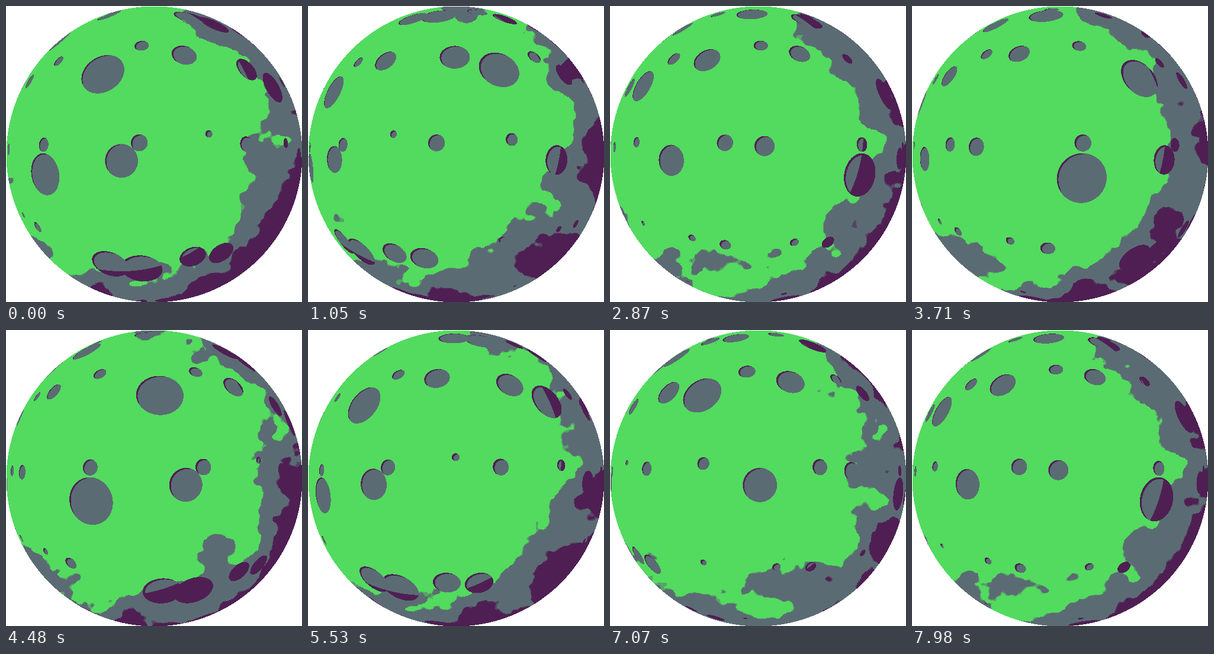
These frames come from a looping animation (500x500 px, 8000 ms). An HTML page with a canvas:

```html
<!DOCTYPE html>
<html lang="en">
<head>
<meta charset="utf-8">
<title>Rotating moon</title>
<style>
  html, body { margin: 0; width: 100%; height: 100%; overflow: hidden; background: #fff; }
  canvas { display: block; width: 500px; height: 500px; }
</style>
</head>
<body>
<canvas id="moon" width="500" height="500"></canvas>
<script>
const SIZE = 500;
const STEP_MS = 70, LOOP_MS = 8000, STEPS_PER_TURN = 72;
const SEED = 9.89;
const LIGHT = { x: 0.39, y: 0.43 };
const GROUND_CELLS = 8, CRATER_CELLS = 5, OCTAVES = 4;
const MID_EDGE = 0.615, DARK_EDGE = 0.729, CRATER_EDGE = 0.465;
const ROUGHNESS = 0.3, DITHER = 2 / SIZE;

const rgb = (r, g, b) => (255 << 24 | b << 16 | g << 8 | r) >>> 0;
const BRIGHT = rgb(82, 219, 94), MID = rgb(91, 107, 115), DARK = rgb(79, 31, 84);

const fract = n => n - Math.floor(n);

// Square table of repeatable random values that tiles in both directions.
function randomTile(cells) {
  return Float64Array.from({ length: cells * cells }, (_, i) => {
    const x = i % cells, y = Math.floor(i / cells);
    return fract(Math.sin(x * 12.9898 + y * 78.233) * 15.5453 * SEED);
  });
}
const groundTile = randomTile(GROUND_CELLS);
const craterTile = randomTile(CRATER_CELLS);

function noise(x, y) {
  const ix = Math.floor(x), iy = Math.floor(y), mask = GROUND_CELLS - 1;
  const fx = x - ix, fy = y - iy;
  const x0 = ix & mask, x1 = (ix + 1) & mask;
  const y0 = (iy & mask) * GROUND_CELLS, y1 = ((iy + 1) & mask) * GROUND_CELLS;
  const sx = fx * fx * (3 - 2 * fx), sy = fy * fy * (3 - 2 * fy);
  const top = groundTile[y0 + x0] * (1 - sx) + groundTile[y0 + x1] * sx;
  const bottom = groundTile[y1 + x0] * (1 - sx) + groundTile[y1 + x1] * sx;
  return top + (bottom - top) * sy;
}

function fbm(x, y) {
  let value = 0, scale = 0.5;
  for (let i = 0; i < OCTAVES; i++) {
    value += noise(x, y) * scale;
    x *= 2;
    y *= 2;
    scale *= 0.5;
  }
  return value;
}

// 0 inside the pit of a grid cell, 1 outside, with a soft rim.
function pit(x, y) {
  const row = Math.floor(y);
  x += row * 0.31;
  const col = Math.floor(x);
  const h = craterTile[(row % CRATER_CELLS) * CRATER_CELLS + col % CRATER_CELLS];
  const centre = 0.25 + h * 0.5, radius = h * 0.25;
  const dx = x - col - centre, dy = y - row - centre;
  const d2 = dx * dx + dy * dy;
  if (d2 >= radius * radius) return 1;
  const t = Math.max(0, (Math.sqrt(d2) - 0.9 * radius) / (0.1 * radius));
  return t * t * (3 - 2 * t);
}

const crater = (x, y) => 1 - pit(x + 11, y + 11) * pit(x + 12, y + 12);

// Everything about a pixel that does not change while the moon turns.
const pixels = [];
for (let py = 0; py < SIZE; py++) {
  for (let px = 0; px < SIZE; px++) {
    const u = px / SIZE, v = py / SIZE;
    if (Math.hypot(u - 0.5, v - 0.5) > 0.49999) continue;
    const cx = u * 2 - 1, cy = v * 2 - 1;
    const z = Math.sqrt(1 - cx * cx - cy * cy);
    const warp = fbm(u, v);
    pixels.push({
      index: py * SIZE + px,
      light: Math.hypot(u - LIGHT.x, v - LIGHT.y),
      checker: (px + py) % 2 === 0,
      gx: u * GROUND_CELLS + warp,
      gy: v * GROUND_CELLS + warp,
      sx: (cx / (z + 1) * 0.5 + 0.5) * CRATER_CELLS,
      sy: (cy / (z + 1) * 0.5 + 0.5) * CRATER_CELLS
    });
  }
}

function groundColor(p, turn) {
  if (p.light + ROUGHNESS < MID_EDGE) return BRIGHT;
  const d = p.light + fbm(p.gx + turn * GROUND_CELLS, p.gy) * ROUGHNESS;
  if (d > DARK_EDGE) return d < DARK_EDGE + DITHER && p.checker ? MID : DARK;
  if (d > MID_EDGE) return d < MID_EDGE + DITHER && p.checker ? BRIGHT : MID;
  return BRIGHT;
}

const rimX = (LIGHT.x - 0.5) * 0.03 * CRATER_CELLS;
const rimY = (LIGHT.y - 0.5) * 0.03 * CRATER_CELLS;

function pixelColor(p, turn) {
  const x = p.sx + turn * CRATER_CELLS;
  const depth = crater(x, p.sy);
  if (depth < 0.5) return groundColor(p, turn);
  if (p.light > CRATER_EDGE) return DARK;
  const shade = crater(x + rimX, p.sy + rimY);
  return shade < depth - (0.5 - p.light) * 2 ? DARK : MID;
}

const context = document.getElementById('moon').getContext('2d');
const image = context.createImageData(SIZE, SIZE);
const buffer = new Uint32Array(image.data.buffer);
let shownStep = -1;

function draw(elapsed) {
  const step = Math.floor((elapsed % LOOP_MS) / STEP_MS) % STEPS_PER_TURN;
  if (step === shownStep) return;
  shownStep = step;
  const turn = step / STEPS_PER_TURN;
  for (const p of pixels) buffer[p.index] = pixelColor(p, turn);
  context.putImageData(image, 0, 0);
}

const start = performance.now();
function tick() {
  draw(performance.now() - start);
  requestAnimationFrame(tick);
}
tick();
</script>
</body>
</html>
```
